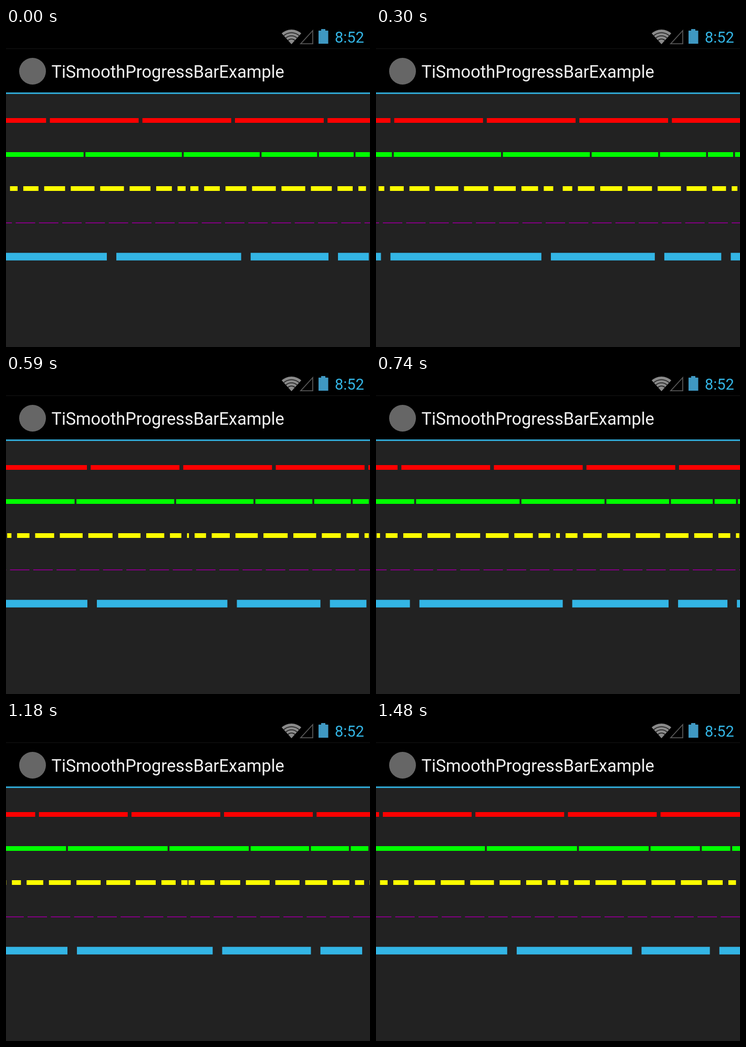
An HTML page that plays this animation: 693x609 px, repeating every 1.64 s.

```html
<!DOCTYPE html>
<html lang="en">
<head>
<meta charset="utf-8">
<title>Smooth progress bars</title>
<style>
  html, body { margin: 0; width: 100%; height: 100%; overflow: hidden; background: #222; }
  svg { display: block; width: 693px; height: 609px; }
  text { font-family: Roboto, sans-serif; }
</style>
</head>
<body>
<svg viewBox="0 0 693 609">
  <rect width="693" height="609" fill="#222"/>
  <rect width="693" height="123.5" fill="#000"/>
  <rect y="39" width="693" height="1" fill="#141414"/>
  <rect y="123" width="693" height="3" fill="#2fa6d2"/>

  <!-- status icons -->
  <clipPath id="fan"><path d="M543.5 31L522 7V0H565V7Z"/></clipPath>
  <g clip-path="url(#fan)">
    <circle cx="543.5" cy="31" r="28" fill="#8a8a8a"/>
    <g fill="none" stroke="#1c1c1c" stroke-width="1.6">
      <circle cx="543.5" cy="31" r="22"/>
      <circle cx="543.5" cy="31" r="16"/>
      <circle cx="543.5" cy="31" r="10"/>
    </g>
  </g>
  <path d="M561 30.2H584V5Z" fill="none" stroke="#565656" stroke-width="1.8"/>
  <path d="M595 5H600V2H608V5H613.5V30H595Z" fill="#3f98c2"/>
  <text x="626" y="27.5" font-size="28.9" fill="#33b5e5">8:52</text>

  <!-- title bar -->
  <circle cx="50.5" cy="82.5" r="25.5" fill="#666"/>
  <text x="86.5" y="95" font-size="32.5" fill="#f3f3f3">TiSmoothProgressBarExample</text>

  <g id="bars" fill="none"></g>
</svg>
<script>
const WIDTH = 768, SCALE = 0.9036, SHIFT = -0.5;
const LOOP = 1640;
const STEPS = [0, 150, 300, 450, 590, 740, 880, 1030, 1180, 1330, 1480];

const linear = x => x;
const accelerate = x => x * x;
const decelerate = x => 1 - (1 - x) ** 2;
const easeInOut = x => (1 - Math.cos(Math.PI * x)) / 2;

// start: section offset at time 0, step: its advance per tick
const bars = [
  { y: 176.5, size: 9, color: '#f00', n: 4, gap: 8, ease: linear, start: 0.12, step: 0.09 },
  { y: 241.5, size: 9, color: '#0f0', n: 6, gap: 4, ease: accelerate, start: 0.05, step: 0.045, reversed: true },
  { y: 306.5, size: 9, color: '#ff0', n: 10, gap: 12, ease: easeInOut, start: 0.098, step: 0.09, mirror: true },
  { y: 372, size: 1.8, color: '#800080', n: 16, gap: 8, ease: linear, start: 0.0268, step: 0.09 },
  { y: 436.5, size: 14.4, color: '#33b5e5', n: 4, gap: 20, ease: decelerate, start: 0.16, step: 0.18 }
];

for (const bar of bars) {
  bar.path = document.createElementNS('http://www.w3.org/2000/svg', 'path');
  bar.path.setAttribute('stroke', bar.color);
  bar.path.setAttribute('stroke-width', bar.size);
  document.getElementById('bars').append(bar.path);
}

const toStage = x => (x * SCALE + SHIFT).toFixed(2);

function outline({ y, n, gap, ease, start, step, reversed, mirror }, tick) {
  const span = mirror ? WIDTH / 2 : WIDTH;
  const total = span + gap + n;
  const offset = (start + step * tick + 1e-9) % (1 / n);
  const line = (a, b) => `M${toStage(a)} ${y}H${toStage(b)}`;
  let d = '', pos = 0;
  for (let i = 0; i <= n; i++) {
    const x = i / n + offset;
    const from = ease(Math.max(0, x - 1 / n)), to = ease(Math.min(1, x));
    const section = Math.floor(total * (to - from) + 1e-5);
    const a = Math.min(span, pos), b = Math.min(span, pos + section - gap);
    if (b > a) {
      if (!reversed) d += line(a, b);
      if (reversed || mirror) d += line(WIDTH - b, WIDTH - a);
    }
    pos += section;
  }
  return d;
}

let shown = -1;
function draw(now) {
  const t = now % LOOP;
  const tick = STEPS.filter(s => s <= t).length - 1;
  if (tick !== shown) {
    shown = tick;
    for (const bar of bars) bar.path.setAttribute('d', outline(bar, tick));
  }
  requestAnimationFrame(draw);
}
draw(0);
</script>
</body>
</html>
```
